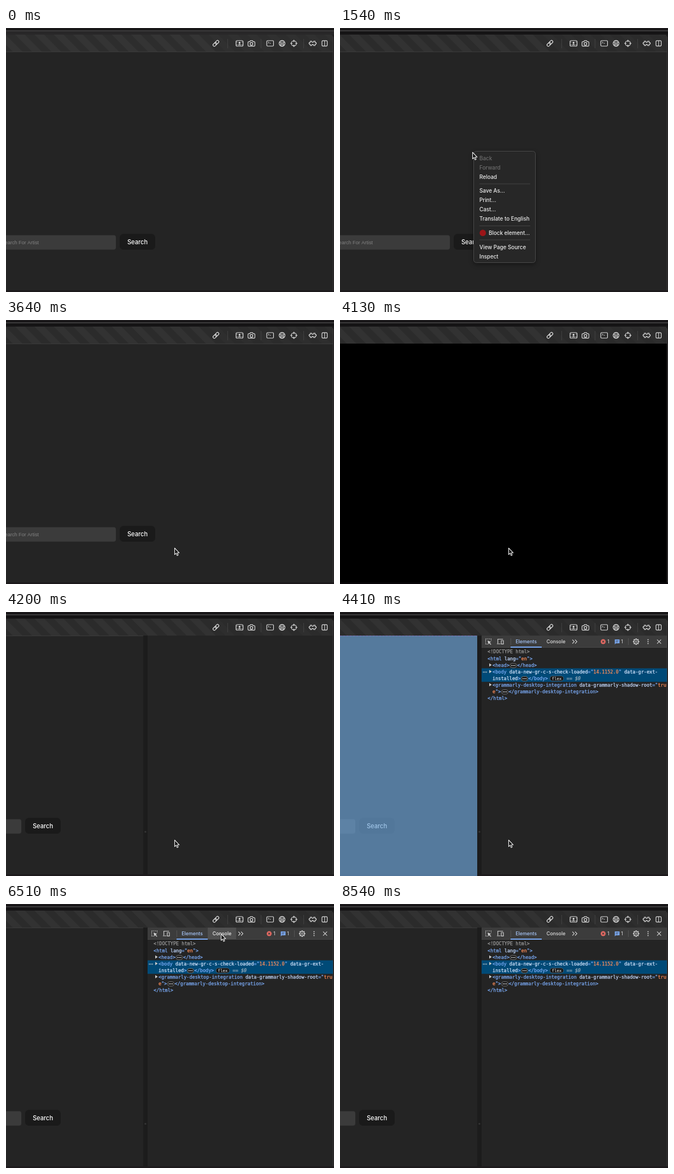
Animation of 600 by 481 pixels, one loop 9.17 s. Source, as an HTML page with a canvas:

```html
<!DOCTYPE html>
<html lang="en">
<head>
<meta charset="utf-8">
<title>Opening the inspector</title>
<style>
html, body { margin: 0; width: 100%; height: 100%; overflow: hidden; background: #242424; }
canvas { display: block; width: 600px; height: 481px; }
</style>
</head>
<body>
<canvas id="stage"></canvas>
<script>
const W = 600, H = 481, LOOP = 9170;
const UI = 'Inter, "Liberation Sans", sans-serif';
const ARIAL = '"Liberation Sans", Arial, sans-serif';
const MONO = '"DejaVu Sans Mono", monospace';
const CODE = 8.53;
const TOP = 43, BOTTOM = 478, RIGHT = 598;
const canvas = document.getElementById('stage');
const ctx = canvas.getContext('2d');
const dpr = window.devicePixelRatio || 1;
canvas.width = W * dpr;
canvas.height = H * dpr;

// Each step: start time, then cursor position (omitted = hidden)
const cursorSteps = [
  [0], [1330, 242, 226], [2100, 245, 226], [2170], [2660, 308, 412],
  [3290, 308, 415], [4970, 269, 53], [5180, 330, 55], [5250],
  [6510, 393, 54], [8470, 425, 68], [8540]
];
const between = (t, a, b) => t >= a && t < b;

function rect(x, y, w, h, color) {
  ctx.fillStyle = color;
  ctx.fillRect(x, y, w, h);
}

function round(x, y, w, h, r, fill, line, lw = 1) {
  ctx.beginPath();
  ctx.roundRect(x, y, w, h, r);
  if (fill) { ctx.fillStyle = fill; ctx.fill(); }
  if (line) { ctx.strokeStyle = line; ctx.lineWidth = lw; ctx.stroke(); }
}

function circle(x, y, r, fill, line, lw = 1) {
  ctx.beginPath();
  ctx.arc(x, y, r, 0, 7);
  if (fill) { ctx.fillStyle = fill; ctx.fill(); }
  if (line) { ctx.strokeStyle = line; ctx.lineWidth = lw; ctx.stroke(); }
}

function path(d, x, y, line, lw = 1, fill) {
  const p = new Path2D(d);
  ctx.save();
  ctx.translate(x, y);
  if (fill) { ctx.fillStyle = fill; ctx.fill(p); }
  if (line) { ctx.strokeStyle = line; ctx.lineWidth = lw; ctx.stroke(p); }
  ctx.restore();
}

// Baseline sits a third of an em below the given centre line
function text(s, x, y, size, color, family = UI, style = '400', align = 'left') {
  ctx.font = `${style} ${size}px ${family}`;
  ctx.textAlign = align;
  ctx.fillStyle = color;
  ctx.fillText(s, x, y + size * 0.36);
  return x + ctx.measureText(s).width;
}

function drawToolbar(t) {
  const early = t < 770;
  rect(0, 0, W, 12, '#1b191b');
  rect(0, 3, W, 1, '#0c0b0c');
  rect(0, 4, W, 2, '#3f3e3f');
  rect(0, 6, W, 6, early ? '#282728' : '#151415');
  ctx.save();
  ctx.beginPath();
  ctx.roundRect(-10, 12, 608, 32, [0, 5, 0, 0]);
  ctx.clip();
  rect(0, 12, W, 32, early ? '#2d2d2d' : '#2b2b2b');
  ctx.fillStyle = early ? '#343434' : '#323232';
  const period = 25 * Math.SQRT2;
  for (let x = -54; x < 600; x += period) {
    ctx.globalAlpha = x < 370 ? 1 : 0.45;
    ctx.beginPath();
    ctx.moveTo(x, 12);
    ctx.lineTo(x + period / 2, 12);
    ctx.lineTo(x + period / 2 + 32, 44);
    ctx.lineTo(x + 32, 44);
    ctx.fill();
  }
  ctx.restore();
  for (const x of [405, 466, 544]) rect(x, 20, 1, 17, '#414141');
  drawBrowserIcons();
}

function drawBrowserIcons() {
  const c = '#e2e2e2', lw = 1.2;
  ctx.save();
  ctx.translate(384, 28);
  ctx.rotate(-Math.PI / 4);
  round(-6.6, -2.4, 7.8, 4.8, 2.4, null, c, lw);
  round(-1.2, -2.4, 7.8, 4.8, 2.4, null, c, lw);
  ctx.restore();

  round(420.8, 23, 12.8, 10, 2, null, c, lw);
  circle(427.2, 27, 1.8, c);
  path('M-3.4 3Q0 -.8 3.4 3Z', 427.2, 28.3, null, 1, c);
  path('M-4.6 -3v1.3M4.6 -3v1.3M-4.6 3v-1.3M4.6 3v-1.3', 427.2, 28, c, 1);

  path('M-4.7 -3.6H-3L-2 -5.2H2L3 -3.6H4.7Q6.3 -3.6 6.3 -2V3.2Q6.3 4.8 4.7 4.8H-4.7Q-6.3 4.8 -6.3 3.2V-2Q-6.3 -3.6 -4.7 -3.6Z', 449, 28.4, c, lw);
  circle(449, 28.9, 2.5, null, c, lw);

  round(477, 23, 12.4, 10, 1.8, null, c, lw);
  path('M-3.8 -2.9L-2 -1.5L-3.8 -.1M-.8 -.1H1.2', 483.2, 28, c, 1);

  circle(505, 28, 5.3, null, c, lw);
  path('M-5 -1.6Q0 1 5 -1.6M-4.4 2.8Q0 .2 4.4 2.8M-1 -5.2Q-4 0 -1 5.2M1 -5.2Q4 0 1 5.2', 505, 28, c, 0.9);

  circle(526.6, 28, 4.7, null, c, lw);
  path('M0 -6.5V-2.5M0 6.5V2.5M-6.5 0H-2.5M6.5 0H2.5', 526.6, 28, c, lw);

  path('M-4.3 -4H-1.8Q-1.8 -1.9 0 -1.9Q1.8 -1.9 1.8 -4H4.3V-1.8Q6.6 -1.8 6.6 0Q6.6 1.8 4.3 1.8V4H1.8Q1.8 1.9 0 1.9Q-1.8 1.9 -1.8 4H-4.3V1.8Q-6.6 1.8 -6.6 0Q-6.6 -1.8 -4.3 -1.8Z', 561, 28, c, lw);

  round(578, 23.2, 9.6, 9.6, 1.6, null, c, lw);
  rect(582.3, 23.2, 1.1, 9.6, c);
}

function drawPage(right, shift) {
  ctx.save();
  ctx.beginPath();
  ctx.rect(0, TOP, right, H - TOP);
  ctx.clip();
  rect(0, TOP, right, H - TOP, '#242424');
  rect(0, TOP, right, 1, '#3b3b3b');
  round(-60 + shift, 377.4, 261, 26.4, 4, '#3b3b3b');
  text('Search For Artist', 60 + shift, 390.5, 9.1, '#828282', ARIAL, '400', 'right');
  round(208 + shift, 375, 65, 29, 7, '#1a1a1a');
  text('Search', 240.5 + shift, 389.7, 11.1, '#ffffff', UI, '500', 'center');
  ctx.restore();
}

function drawOverlay() {
  rect(0, TOP, 251, H - TOP, 'rgba(111,168,220,.66)');
  ctx.save();
  ctx.setLineDash([3, 3]);
  path('M0 43.5H251', 0, 0, '#8a6fc0', 1);
  ctx.restore();
}

function drawMenu(t) {
  const alpha = t < 3430 ? 1 : t < 3500 ? 0.75 : t < 3570 ? 0.45 : 0.18;
  const lit = between(t, 2660, 3290) || t >= 3360;
  ctx.save();
  ctx.globalAlpha = alpha;
  ctx.save();
  ctx.shadowColor = 'rgba(0,0,0,.45)';
  ctx.shadowBlur = 9 * dpr;
  ctx.shadowOffsetY = 3 * dpr;
  round(244.5, 224.5, 113, 203, 5, '#272727');
  ctx.restore();
  round(244.5, 224.5, 113, 203, 5, null, '#4b4b4b');
  if (lit) round(249, 408, 104, 17, 3.5, '#2b5fb8');
  const item = (s, y, color = '#ededed', x = 255) => text(s, x, y, 9.8, color, UI, '500');
  item('Back', 237, '#6c6c6c');
  item('Forward', 254, '#6c6c6c');
  item('Reload', 271);
  item('Save As...', 296.8);
  item('Print...', 313.8);
  item('Cast...', 330.8);
  item('Translate to English', 347.8);
  item('Block element...', 373.5, '#ededed', 272);
  item('View Page Source', 399);
  item('Inspect', 416);
  circle(261.2, 373.4, 5.8, '#9c1518');
  for (const y of [283.5, 360, 385.5]) rect(255, y, 93, 1, '#444444');
  ctx.restore();
}

// Writes [text, colour] pairs one after the other, slightly emboldened
function code(x, y, parts, style) {
  for (const [s, color] of parts) {
    const end = text(s, x, y, CODE, color, MONO, style);
    ctx.strokeStyle = color;
    ctx.lineWidth = 0.25;
    ctx.strokeText(s, x, y + CODE * 0.36);
    x = end;
  }
}

function dots(x, y) {
  round(x, y - 3.5, 12, 8, 4, '#161616', '#9b9b9b', 0.7);
  for (let i = -1; i < 2; i++) circle(x + 6 + i * 2.8, y + 0.5, 0.9, '#f0f0f0');
}

function drawTree() {
  const tag = '#7cacf8', attr = '#c2d8fc', val = '#fe8d59', gray = '#999999', sel = '#d6e5ff';
  rect(259, 102.6, RIGHT - 259, 24.6, '#004a77');
  for (const y of [97, 109, 133]) path('M-2 -3L2.5 0L-2 3Z', 275, y - 0.5, null, 1, '#c9c9c9');
  for (let i = 0; i < 3; i++) circle(262.3 + i * 2.8, 109.5, 0.9, '#d0d0d0');

  code(270, 72.3, [['<!DOCTYPE html>', gray]]);
  code(270, 84.7, [['<html', tag], [' lang', attr], ['="', tag], ['en', val], ['">', tag]]);
  code(279, 97, [['<head>', tag]]);
  dots(311, 97);
  code(324, 97, [['</head>', tag]]);
  code(279, 109, [['<body', tag], [' data-new-gr-c-s-check-loaded', sel], ['="', tag],
    ['14.1152.0', val], ['"', tag], [' data-gr-ext-', sel]]);
  code(279, 121, [['installed', sel], ['>', tag]]);
  dots(331.5, 121);
  code(344.5, 121, [['</body>', tag]]);
  round(384, 116.7, 25, 9, 4.5, '#161616', '#62778a', 0.7);
  text('flex', 396.5, 121, 7.6, '#f0f0f0', MONO, '400', 'center');
  code(414.5, 121, [['== $0', '#9db0bf']], 'italic');
  code(279, 133, [['<grammarly-desktop-integration', tag], [' data-grammarly-shadow-root', attr],
    ['="', tag], ['tru', val]]);
  code(279, 145, [['e', val], ['">', tag]]);
  dots(295.5, 145);
  code(308.5, 145, [['</grammarly-desktop-integration>', tag]]);
  code(270, 157, [['</html>', tag]]);
}

function drawTabs(hover) {
  const c = '#d0d0d0', bar = '#3c3c3c';
  rect(259, TOP, RIGHT - 259, 21, bar);
  rect(259, 64, RIGHT - 259, 1, '#484848');
  if (hover) rect(369, TOP, 52, 21, '#4f4f4f');

  ctx.save();
  ctx.setLineDash([1.8, 1.4]);
  path('M-1.5 4.5H-5V-5H5V-1.5', 271.5, 54, c, 1.1);
  ctx.restore();
  path('M-1.5 -1.5L5 1L2.2 2.2L5.2 5.2L4.2 6.2L1.2 3.2L0 6Z', 271.5, 53.5, null, 1, c);
  path('M5 -4.5H-4.5V3M-6.2 4H.2M1.8 -2H5.7V4.4H1.8Z', 293.2, 54, c, 1.2);

  rect(312, 48, 1, 12, '#555555');
  text('Elements', 340.6, 54, 8.85, '#a8c7fa', UI, '500', 'center');
  rect(312, 63, 57, 2, '#7cacf8');
  text('Console', 395, 54, 8.85, hover ? '#f0f0f0' : '#dedede', UI, '500', 'center');
  path('M-4.2 -3.5L-.7 0L-4.2 3.5M.7 -3.5L4.2 0L.7 3.5', 429.3, 54, c, 1.1);

  circle(481.4, 54, 4.5, '#e46962');
  path('M-1.7 -1.7L1.7 1.7M1.7 -1.7L-1.7 1.7', 481.4, 54, bar, 1.1);
  text('1', 489, 54, 8.8, '#dedede');
  path('M-4.3 -4H4.3V3H-2.4L-4.3 5Z', 507, 54, null, 1, '#7cacf8');
  path('M-2.6 -1.8H2.6M-2.6 .6H1.4', 507, 54, bar, 0.9);
  text('1', 514, 54, 8.8, '#dedede');
  rect(527, 48, 1, 12, '#555555');

  for (let i = 0; i < 8; i++) {
    ctx.save();
    ctx.translate(541.7, 54);
    ctx.rotate(i * Math.PI / 4);
    rect(-1.2, -5.8, 2.4, 2, c);
    ctx.restore();
  }
  circle(541.7, 54, 4, null, c, 1.2);
  circle(541.7, 54, 1.6, null, c, 1);
  for (let i = -1; i < 2; i++) circle(563.5, 54 + i * 3.5, 1.1, c);
  path('M-3.6 -3.6L3.6 3.6M3.6 -3.6L-3.6 3.6', 583.7, 54, c, 1.2);
}

function drawDevtools(t) {
  rect(251, TOP, 8, H - TOP, '#1c1c1c');
  circle(255, 400.5, 1.8, '#343434');
  rect(259, TOP, RIGHT - 259, H - TOP, '#242424');
  if (t >= 4270) drawTabs(between(t, 5530, 8470));
  if (t >= 4340) drawTree();
}

function drawCursor(t) {
  const [, x, y] = cursorSteps.filter(s => s[0] <= t).pop();
  if (x === undefined) return;
  ctx.lineJoin = 'round';
  path('M.5 .5V12.4L3.2 9.9L5.1 14.2L7 13.3L5.2 9.2H8.8Z', x, y, '#f4f4f4', 1.1, '#161616');
  ctx.lineJoin = 'miter';
}

function draw(t) {
  const black = between(t, 4130, 4200), overlay = between(t, 4410, 5180);
  ctx.setTransform(dpr, 0, 0, dpr, 0, 0);
  drawToolbar(t);
  if (t < 4130) drawPage(RIGHT, 0);
  else if (black) rect(0, TOP, RIGHT, H - TOP, '#000000');
  else {
    drawPage(251, -173);
    drawDevtools(t);
  }
  // Window frame
  rect(0, BOTTOM, W, H - BOTTOM, black ? '#080608' : '#1d1a1c');
  rect(RIGHT, 16, 1, BOTTOM - 16, '#3a3939');
  rect(RIGHT + 1, 12, 1, H - 12, '#1b191b');
  if (overlay) drawOverlay();
  if (between(t, 1540, 3640)) drawMenu(t);
  drawCursor(t);
}

const start = performance.now();
function tick() {
  draw((performance.now() - start) % LOOP);
  requestAnimationFrame(tick);
}
tick();
</script>
</body>
</html>
```
